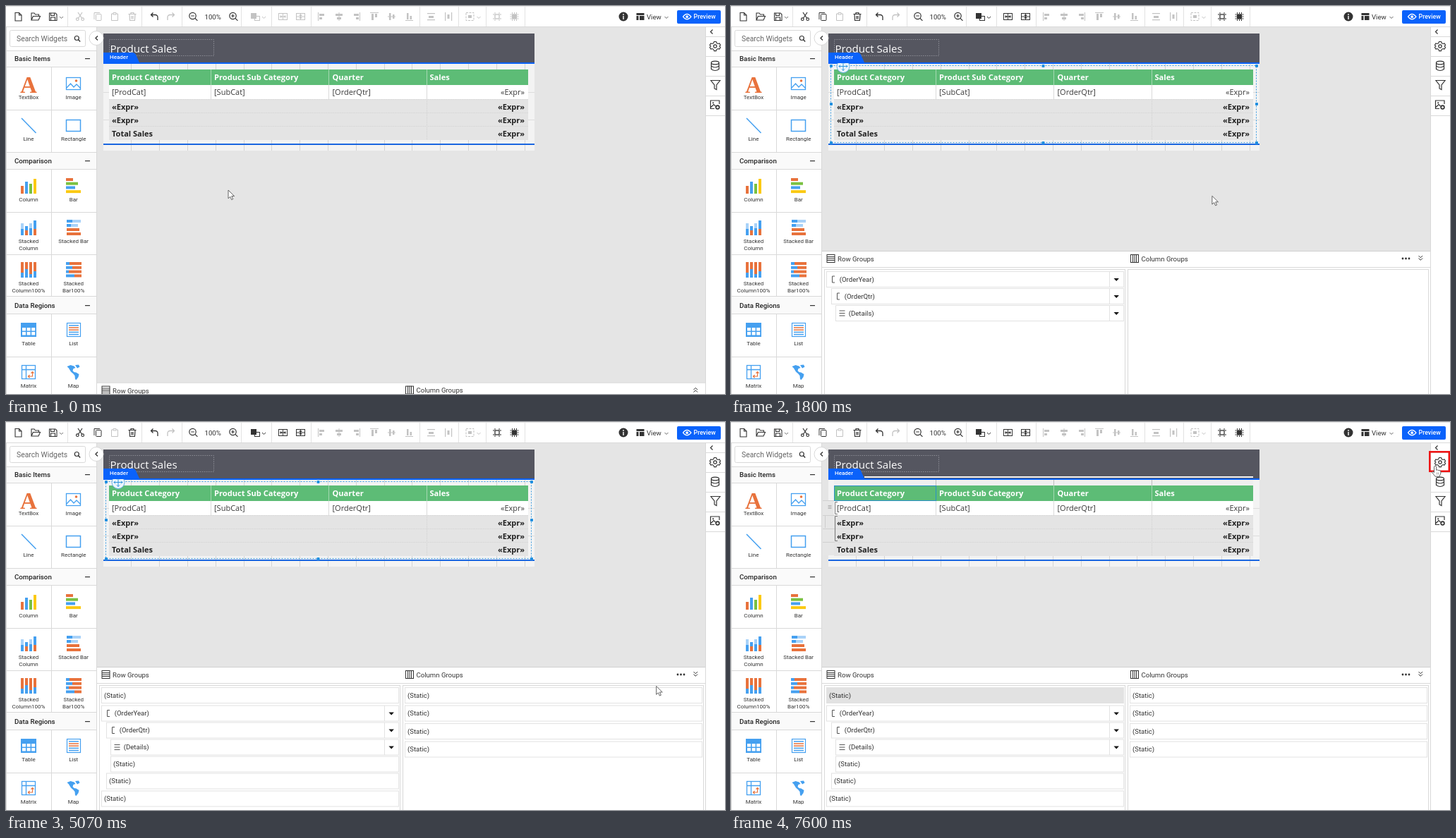
Animation, 1019 px wide and 550 px high, one loop 8000 ms. Source, as an HTML page:

```html
<!DOCTYPE html>
<html lang="en">
<head>
<meta charset="utf-8">
<title>Report designer</title>
<style>
  html, body { margin: 0; width: 100%; height: 100%; overflow: hidden; background: #fff; }
  svg { display: block; width: 100%; height: 100%; }
  text { font-family: Roboto, Arial, sans-serif; white-space: pre; }
  .report text { font-family: "Open Sans", "Noto Sans", sans-serif; }
</style>
</head>
<body>
<script>
const INK = '#333', FADED = '#c3c3c3', EDGE = '#d9d9d9';
const BLUE = '#0a62fb', SKY = '#45a0f0', PALE = '#a9d2f8', ORANGE = '#e8723c', RED = '#ee1111';

const rect = (x, y, w, h, fill, more = '') =>
  `<rect x="${x}" y="${y}" width="${w}" height="${h}" fill="${fill}" ${more}/>`;
const frame = (x, y, w, h, stroke, fill = 'none', more = '') =>
  rect(x, y, w, h, fill, `stroke="${stroke}" ${more}`);
const path = (d, stroke = INK, more = '') =>
  `<path d="${d}" fill="none" stroke="${stroke}" ${more}/>`;
const shape = (d, fill = INK, more = '') => `<path d="${d}" fill="${fill}" ${more}/>`;
const disc = (x, y, r, fill, more = '') => `<circle cx="${x}" cy="${y}" r="${r}" fill="${fill}" ${more}/>`;
const text = (x, y, s, size = 9.6, fill = INK, more = '') =>
  `<text x="${x}" y="${y}" font-size="${size}" fill="${fill}" ${more}>${s}</text>`;
const group = (id, body, more = '') => `<g id="${id}" ${more}>${body}</g>`;
const MID = 'text-anchor="middle"', END = 'text-anchor="end"', MEDIUM = 'font-weight="500"', BOLD = 'font-weight="700" ';
const chevron = (x, y, c = INK) => path(`M${x - 2.5} ${y - 1}l2.500 2.500 2.500-2.500`, c);

// ---- toolbar ----
const artboard = (x, c, filled) =>
  frame(x - 3, 12, 6, 6, c, filled ? c : 'none', 'stroke-width="1.300"') +
  path(`M${x - 6} 12h2M${x + 4} 12h2M${x - 6} 18h2M${x + 4} 18h2` +
       `M${x - 3} 9v2M${x + 3} 9v2M${x - 3} 19v2M${x + 3} 19v2` +
       (filled ? `M${x} 9v2M${x} 19v2M${x - 6} 15h2M${x + 4} 15h2` : ''), c);

const editTools = c =>
  path('M102 9l6 9M108 9l-6 9', c, 'stroke-width="1.200"') +
  disc(101.3, 18.7, 1.8, '#fff', `stroke="${c}" stroke-width="1.200"`) +
  disc(108.7, 18.7, 1.8, '#fff', `stroke="${c}" stroke-width="1.200"`) +
  path('M133 9.500h-8v9.500', c) + frame(127.5, 11.5, 7.5, 9, c, 'none', 'rx="1"') +
  path('M173.500 11.500h11M177 11.500v-2h4v2M175 12l.6 8.500h6.800l.6-8.500M178 14v4.500M180 14v4.500', c, 'stroke-width="1.200"') +
  frame(352.5, 14.5, 7, 6, c) + rect(347, 10, 8, 8, c) + chevron(365.5, 16, c) +
  [386, 411].map((x, i) =>
    frame(x + .5, 10.5, 12, 9, c) +
    (i ? path(`M${x} 15h12M${x + 6.5} 11v8`, c) : path(`M${x + 2} 15h9M${x + 6.5} 11v8`, c)) +
    shape(i ? `M${x + 4} 12.500h5l-2.500 2.500zM${x + 4} 17.500h5l-2.500-2.500z`
            : `M${x + 3} 13v4l2.500-2zM${x + 10} 13v4l-2.500-2z`, c)).join('') +
  artboard(696, c) + artboard(720.5, c, true);

const zoom = (x, plus) =>
  disc(x, 14, 4.7, 'none', `stroke="${INK}" stroke-width="1.200"`) +
  path(`M${x + 3.4} 17.400l3.500 3.500M${x - 2.3} 14h4.600${plus ? `M${x} 11.700v4.600` : ''}`, INK, 'stroke-width="1.200"');

const alignTools = () =>
  shape('M442 9h1v12h-1zM444 11h7v3h-7zM444 16h4v3h-4z' +
        'M471.500 9h1v12h-1zM467 11h10v3h-10zM469 16h6v3h-6z' +
        'M501 9h1v12h-1zM493 11h7v3h-7zM496 16h4v3h-4z' +
        'M516 9h12v1h-12zM518 11h3v9h-3zM523 11h3v5h-3z' +
        'M541 14.500h11v1h-11zM543 10h2.500v10h-2.500zM548 12h2.500v6h-2.500z' +
        'M566 20h11v1h-11zM568 10h2.500v9h-2.500zM572.500 14h2.500v5h-2.500z' +
        'M597 10h11v1.200h-11zM599 14h7v3h-7zM597 19h11v1.200h-11z' +
        'M622 9h1.200v12h-1.200zM631 9h1.200v12h-1.200zM625.500 12h3v6h-3z', FADED) +
  frame(652, 9.5, 11, 11, FADED, 'none', 'stroke-dasharray="3 1.500"') + rect(655, 13, 5, 4, FADED) + chevron(670, 16, FADED);

const toolbar = () =>
  rect(0, 0, 1019, 30, '#fff') + rect(0, 29, 1019, 1, EDGE) + rect(0, 0, 1019, 1, '#e6e6e6') +
  [87, 192, 249, 333, 376, 432, 586, 641, 680, 735].map(x => rect(x, 1, 1, 28, '#e2e2e2')).join('') +
  path('M13 9.500h5.500l3.500 3.500v8h-9zM18.500 9.500v3.500h3.500', INK, 'stroke-width="1.100"') +
  path('M36 20v-10h4l1.500 2h5v2.500M36 20l2.500-5.500h10l-2.500 5.500z', INK, 'stroke-width="1.100"') +
  path('M61.500 10h8.500l2 2v8.500h-10.500zM63.500 10v3.500h5v-3.500M63.500 20.500v-4.500h6v4.500', INK, 'stroke-width="1.100"') +
  chevron(78.5, 16, '#777') +
  path('M152 11h-2.500v9.500h9v-9.500h-2.500M152 9.500h4v2.500h-4z', FADED) +
  path('M208.500 9.500l-3 3 3 3M206 12.500h5.500a3.500 3.500 0 0 1 3.500 3.500v4', INK, 'stroke-width="1.300"') +
  path('M235.500 9.500l3 3-3 3M238 12.500h-5.500a3.500 3.500 0 0 0-3.500 3.500v4', FADED, 'stroke-width="1.300"') +
  zoom(264.5) + text(281.5, 18.5, '100%') + zoom(321.5, true) +
  group('toolsOff', editTools(FADED)) + group('toolsOn', editTools(INK)) + alignTools() +
  disc(875, 15, 6.5, INK) + rect(874.3, 14, 1.4, 5, '#fff') + disc(875, 12, .9, '#fff') +
  shape('M893.500 10h11v3h-11zM893.500 14h3v6h-3zM898 14h6.500v6h-6.500z') +
  text(908, 19, 'View') + chevron(936, 16, '#666') +
  rect(951, 6, 62, 19, BLUE, 'rx="2"') +
  path('M959.500 15.200q5.500-7.500 11.500 0q-6 7.500-11.500 0z', '#fff', 'stroke-width="1.200"') +
  disc(965.2, 15.2, 1.9, '#fff') + text(974.5, 18.3, 'Preview', 8.8, '#fff', MEDIUM);

// ---- widget list ----
const stackedV = (x, y, h, cut, top, base) => rect(x, y, 4, cut, top) + rect(x, y + cut, 4, h - cut, base);
const stackedH = (x, y, w, cut, left, right) => rect(x, y, cut, 4, left) + rect(x + cut, y, w - cut, 4, right);
const each = (n, f) => Array.from({ length: n }, (_, i) => f(i)).join('');

const widgetIcons = () =>
  `<text x="32" y="122.500" font-size="33" fill="${ORANGE}" ${BOLD} ${MID} style="font-family:'Liberation Serif',serif">A</text>` +
  frame(85.5, 101.5, 20, 17, SKY, '#fff', 'stroke-width="1.300"') +
  path('M86 116l5.500-6 4.500 5 4-4 5.500 5.500', SKY, 'stroke-width="1.300"') + disc(99.5, 106, 1.8, ORANGE) +
  path('M22 159l20.500 21', SKY, 'stroke-width="1.500"') +
  frame(85.5, 161.5, 20, 16, SKY, 'none', 'stroke-width="1.500"') +
  [[ORANGE, 11], [SKY, 17], ['#7ac142', 14], ['#fbc913', 21]].map(([c, h], i) => rect(21 + 6 * i, 266 - h, 4, h, c)).join('') +
  [[ORANGE, 10], ['#7ac142', 17], [SKY, 13], ['#fbc913', 21]].map(([c, w], i) => rect(85, 244 + 5.7 * i, w, 4, c)).join('') +
  each(4, i => stackedV(21 + 6 * i, [308, 312, 308, 304][i], [17, 13, 17, 21][i], [8, 6, 7, 12][i], i % 2 ? SKY : PALE, i % 2 ? ORANGE : SKY)) +
  each(4, i => stackedH(86, 303 + 6 * i, [20, 16, 18, 20][i], [8, 6, 11, 13][i], i < 2 ? SKY : ORANGE, i < 2 ? PALE : ORANGE)) +
  each(4, i => stackedV(21 + 6 * i, 363, 22, [15, 10, 17, 13][i], ORANGE, SKY)) +
  each(4, i => stackedH(85, 363 + 5.8 * i, 22, [5, 9, 4, 12][i], SKY, ORANGE)) +
  rect(21, 449, 22, 20, SKY) + each(6, i => rect(23 + 6.6 * (i % 3), 456 + 6 * (i / 3 | 0), 5, 4.5, '#fff')) +
  frame(86.5, 449.5, 19, 19, SKY, '#fff', 'stroke-width="1.200"') +
  each(5, i => rect(89, 452 + 3.2 * i, 14, 1.5, i == 1 || i == 2 ? ORANGE : SKY)) +
  frame(22.5, 509.5, 19, 19, SKY, '#fff', 'stroke-width="1.300"') + path('M23 515.500h19M28.500 510v19', SKY, 'stroke-width="1.300"') +
  path('M32 525h5.500v-6M33.500 523l-2 2 2 2M35.500 520.500l2-2 2 2', ORANGE, 'stroke-width="1.200"') +
  shape('M86.500 511l5-2 5 1.500 2 2.500-3 1-1 3 2 2 3 .5 4 2.500-1 4-3 4-1.500-1-.5-5-2.500-3-3-2.500-3-5z', SKY) +
  shape('M98 509l5-.5 1.500 3-3.500 2z', SKY);

const labels = [
  [131.5, 'TextBox', 'Image'], [191, 'Line', 'Rectangle'], [276.5, 'Column', 'Bar'],
  [336, 'Stacked', 'Stacked Bar'], [345.5, 'Column', ''], [396, 'Stacked', 'Stacked'],
  [405.5, 'Column100%', 'Bar100%'], [481, 'Table', 'List'], [541, 'Matrix', 'Map']];

const widgets = () =>
  rect(0, 30, 129, 520, '#fff') + rect(128, 30, 1, 520, EDGE) + rect(0, 30, 1, 520, EDGE) +
  [63, 208, 412].map(y => rect(1, y, 127, 24, '#fafafa')).join('') +
  [63, 86, 147, 207, 231, 292, 352, 411, 436, 497].map(y => rect(0, y, 128, 1, EDGE)).join('') +
  [[87, 120], [232, 179], [437, 113]].map(([y, h]) => rect(64, y, 1, h, EDGE)).join('') +
  [[78, 'Basic Items'], [223, 'Comparison'], [428, 'Data Regions']].map(([y, s]) =>
    text(12, y, s, 9.7, '#222', MEDIUM) + rect(112, y - 4, 7, 1.2, INK)).join('') +
  frame(5.5, 34.5, 107, 23, EDGE, '#fff', 'rx="2"') + text(15, 49.5, 'Search Widgets', 10.4, '#666') +
  disc(100.3, 45.5, 3, 'none', `stroke="${INK}" stroke-width="1.200"`) + path('M102.500 47.700l2.700 2.700', INK, 'stroke-width="1.400"') +
  labels.map(([y, a, b]) => text(32, y, a, 8, INK, MID) + text(95.7, y, b, 8, INK, MID)).join('') + widgetIcons();

const collapse = () =>
  disc(128, 45.5, 10, '#fff', `stroke="${EDGE}"`) + path('M130 42.500l-3 3 3 3', INK, 'stroke-width="1.300"');

// ---- right strip ----
const sidebar = () =>
  rect(991, 30, 28, 520, '#fff') + rect(991, 30, 1, 520, EDGE) +
  [43, 71, 99, 127, 155].map(y => rect(992, y, 27, 1, EDGE)).join('') +
  path('M1001.500 33.500l-3 3 3 3', INK, 'stroke-width="1.200"') +
  disc(1005, 57, 2.2, 'none', `stroke="${INK}" stroke-width="1.200"`) +
  path('M1003.500 50.500h3l.6 2 2 1 2-.6 1.500 2.600-1.500 1.500 1.500 1.500-1.500 2.600-2-.5-2 1-.6 2h-3l-.6-2-2-1-2 .5-1.500-2.600 1.500-1.500-1.500-1.500 1.500-2.600 2 .6 2-1z', INK, 'stroke-width="1.100"') +
  `<ellipse cx="1005" cy="80.500" rx="5.500" ry="2.300" fill="none" stroke="${INK}" stroke-width="1.200"/>` +
  path('M999.500 80.500v9q5.500 4 11 0v-9M999.500 85q5.500 4 11 0', INK, 'stroke-width="1.200"') +
  path('M999 105.500h13l-5 6.500v6.500l-3-1.500v-5z', INK, 'stroke-width="1.200"') +
  path('M1004 145.500h-5.500v-11.500h12.500v5M999 143.500l4-4 2.500 2.500', INK, 'stroke-width="1.200"') +
  disc(1002.2, 137.3, 1.1, INK) + disc(1008.5, 143.5, 2.4, '#fff', `stroke="${INK}" stroke-width="1.600"`);

// ---- report ----
const columns = [[150, 'Product Category', '[ProdCat]'], [295, 'Product Sub Category', '[SubCat]'],
                 [462.5, 'Quarter', '[OrderQtr]'], [600.5, 'Sales', '']];

const report = () =>
  rect(129, 30, 862, 520, '#e5e5e5') +
  rect(138, 39, 611, 41, '#555660') +
  frame(146.5, 47.5, 148, 23, '#8b8c94', 'none', 'stroke-dasharray="1.500 1.500"') +
  text(147.5, 65.7, 'Product Sales', 15.1, '#fff') +
  rect(138, 82, 611, 123, '#f3f3f3') +
  each(15, i => rect(Math.round(177.4 + 39.8 * i), 82, 1, 123, '#d4d4d4')) +
  [122, 161].map(y => rect(138, y, 611, 1, '#dcdcdc')).join('') +
  rect(138, 80, 611, 2, BLUE) + rect(138, 195, 611, 2, '#1a66e0') +
  rect(146, 90, 594, 22, '#5dbc76') + rect(146, 112, 594, 20, '#fff') + rect(146, 132, 594, 58, '#e4e4e4') +
  [290, 457, 596].map(x => rect(x, 90, 1, 22, '#a5d9b2') + rect(x, 112, 1, 20, '#dadada')).join('') +
  path('M146 132.500h594M146 151.500h594M146 170.500h594M596.500 132v58', '#d5d5d5', 'stroke-dasharray="1.500 1"') +
  columns.map(([x, a, b]) => text(x, 105, a, 11.1, '#fff', BOLD) + text(x, 126.3, b, 11, '#3a3a3a')).join('') +
  text(735, 126.3, '«Expr»', 11, '#3a3a3a', END) +
  ['«Expr»', '«Expr»', 'Total Sales'].map((s, i) =>
    text(150, 146.5 + 19.1 * i, s, 11, '#222', BOLD) + text(735, 146.5 + 19.1 * i, '«Expr»', 11, '#222', BOLD + END)).join('');

const dot = (x, y) => rect(x - 2, y - 2, 4, 4, '#1f8fe0', 'rx="1"');
const selection = () =>
  frame(141.5, 84.5, 603, 109, '#3a9be0', 'none', 'stroke-dasharray="2 2"') +
  [142, 442.5, 745].map(x => [85, 139, 194].map(y => x == 442.5 && y == 139 ? '' : dot(x, y)).join('')).join('') +
  disc(159, 85.5, 9, '#eef6fc', 'stroke="#6ab0e4"') +
  path('M153 85.500h12M159 79.500v12M155 83.500l-2 2 2 2M163 83.500l2 2-2 2M157 81.500l2-2 2 2M157 89.500l2 2 2-2', '#2a93dd');

const cellFocus = () =>
  rect(146, 82, 594, 8, '#efefef') + rect(189, 77, 551, 2, '#f4f4f4') +
  [290, 457, 596].map(x => rect(x, 82, 1, 8, '#bdbdbd')).join('') +
  rect(130, 112, 16, 77, '#e6e6e6') + path('M130 111.500h16M130 132.500h16M130 151.500h16M130 170.500h16', '#d0d0d0') +
  path('M137.500 118.500h5M137.500 120.500h5M137.500 122.500h5', '#aaa') +
  path('M151 113.500h-3.500v17h3.500M151 133.500h-3.500v35h3.500', '#777') + path('M133.500 133v17', '#ccc') +
  frame(146.5, 90.5, 144, 21, '#2a8fc8');

// ---- grouping panel ----
const panelHead = () =>
  rect(129, 347, 862, 203, '#fff') + rect(129, 347, 862, 1, '#d0d0d0') + rect(129, 370, 862, 1, EDGE) +
  frame(136, 352.5, 11, 11, INK) + path('M136 355.500h11M136 358h11M136 360.500h11') +
  frame(566.5, 352.5, 11, 11, INK) + path('M569.500 352v11M572 352v11M574.500 352v11') +
  text(151, 362, 'Row Groups') + text(581.5, 361.5, 'Column Groups') +
  group('up', path('M974.500 357.500l2.800-2.800 2.800 2.800M974.500 361l2.800-2.800 2.800 2.800')) +
  group('down', path('M974.500 354l2.800 2.800 2.800-2.800M974.500 357.500l2.800 2.800 2.800-2.800') +
    [952, 956.5, 961].map(x => disc(x, 358, 1.4, INK)).join(''));

const row = (x, y, label, end = 557, more = '') => {
  const fixed = label == '(Static)', details = label == '(Details)';
  const mark = details ? `M${x + 5.5} ${y - 3.5}h8M${x + 5.5} ${y}h8M${x + 5.5} ${y + 3.5}h8`
                       : `M${x + 12} ${y - 4.5}h-3.500v9h3.500`;
  return frame(x + .5, y - 11, end - x - 1, 22, '#e2e2e2', '#fff', more) +
    text(x + (fixed ? 4 : 18.7), y + 3.4, label) +
    (fixed ? '' : path(mark, '#555') + rect(536, y - 11, 1, 22, '#e2e2e2') + shape(`M542.500 ${y - 1.5}h7.400l-3.700 4z`, '#111'));
};
const groupRows = y => row(135, y, '(OrderYear)') + row(142, y + 24, '(OrderQtr)') + row(148, y + 48, '(Details)');

const panelBody = () =>
  frame(132.5, 373.5, 426, 190, EDGE) + frame(562.5, 373.5, 426, 190, EDGE) +
  group('simple', groupRows(387.5)) +
  group('advanced',
    row(135, 387.5, '(Static)', 557, 'id="firstRow"') +
    groupRows(413) + row(148, 485, '(Static)') + row(142, 509, '(Static)') + row(135, 534, '(Static)') +
    [387.5, 413, 438.5, 464].map(y => row(565, y, '(Static)', 987)).join(''));

const menu = () =>
  rect(850, 365, 115, 27, '#fff', 'style="filter:drop-shadow(0 2px 4px #0004)"') +
  rect(850, 365, 115, 27, '#f0f0f0', 'id="menuHover"') + text(872, 383.3, 'Advanced', 10.3);

const redBox = (id, x, y, w, h) => frame(x, y, w, h, RED, 'none', `id="${id}" stroke-width="2.500"`);

const arrow = shape('M0 0v11.800l2.800-2.500 1.900 4.300 2-.9-1.900-4.200h3.800z', '#fff', 'stroke="#555" stroke-width=".9"');
const hand = shape('M-1.500 1.200q1.500-2 3 0v5l1.700-.4 1.600.8 1.500.1 1.600 1q.6 3.500-1.400 6v1.500h-6.500l-4.500-6q.6-1.800 3 .3z', '#fff', 'stroke="#555" stroke-width=".9"') +
  path('M2.500 9.500v3M4.500 9.500v3', '#777', 'stroke-width=".7"');

document.body.innerHTML = `<svg viewBox="0 0 1019 550" preserveAspectRatio="none">
  ${group('report', report(), 'class="report"')}
  ${group('cellIcon', frame(278, 92.5, 9.5, 9.5, '#1f7fae') + path('M278 95.500h9.500M281 98.500h4', '#1f7fae', 'stroke-width="1.500"'))}
  ${group('selection', selection())}${group('cellFocus', cellFocus())}
  ${shape('M138 66h41q4 0 5.500 4l4.500 10v1h-51z', BLUE)}${text(147, 75.3, 'Header', 8, '#fff', MEDIUM)}
  ${group('head', panelHead())}${group('body', panelBody())}
  ${widgets()}${collapse()}${sidebar()}${toolbar()}
  ${group('menu', menu())}
  ${redBox('redMenu', 849.5, 364.5, 115, 27)}
  ${redBox('redRow', 132.5, 373.5, 427, 28.5)}
  ${redBox('redGear', 990.3, 42.3, 27.5, 27.5)}
  ${group('cursor', group('arrow', arrow) + group('hand', hand))}
</svg>`;

// ---- time ----
const LOOP = 8000;
const moves = [[540, 940, 145, 89], [1270, 2140, 955, 361], [3610, 3940, 937.5, 374],
               [5000, 5600, 528, 386], [7000, 7540, 998, 62]];
const at = id => document.getElementById(id);
const show = (id, on) => at(id).style.display = on ? '' : 'none';

function cursorAt(t) {
  let x = 315, y = 261;
  for (const [from, to, tx, ty] of moves) {
    const u = Math.min(1, Math.max(0, (t - from) / (to - from)));
    const k = u * u * (3 - 2 * u);
    x += (tx - x) * k;
    y += (ty - y) * k;
  }
  return [x, y];
}

function draw(t) {
  const during = (from, to = LOOP) => t >= from && t < to;
  const open = during(930), advanced = during(5000), picked = during(7000);
  const [x, y] = cursorAt(t);
  const pointing = during(2200, 5000) || during(7530);

  show('cellIcon', during(840, 930));
  show('selection', open && !picked);
  show('cellFocus', picked);
  show('toolsOff', !open);
  show('toolsOn', open);
  show('up', !open);
  show('down', open);
  show('body', open);
  at('head').setAttribute('transform', `translate(0 ${open ? 0 : 186.5})`);
  show('simple', !advanced);
  show('advanced', advanced);
  at('firstRow').setAttribute('fill', picked ? '#e2e2e2' : x < 557 ? '#f1f1f1' : '#fff');
  show('menu', during(3270, 5000));
  show('menuHover', y > 365);
  show('redMenu', during(4000, 5000));
  show('redRow', during(5660, 7000));
  show('redGear', during(7595));
  show('arrow', !pointing);
  show('hand', pointing);
  at('cursor').setAttribute('transform', `translate(${x.toFixed(2)} ${y.toFixed(2)})`);
}

const start = performance.now();
(function tick() {
  draw((performance.now() - start) % LOOP);
  requestAnimationFrame(tick);
})();
</script>
</body>
</html>
```
